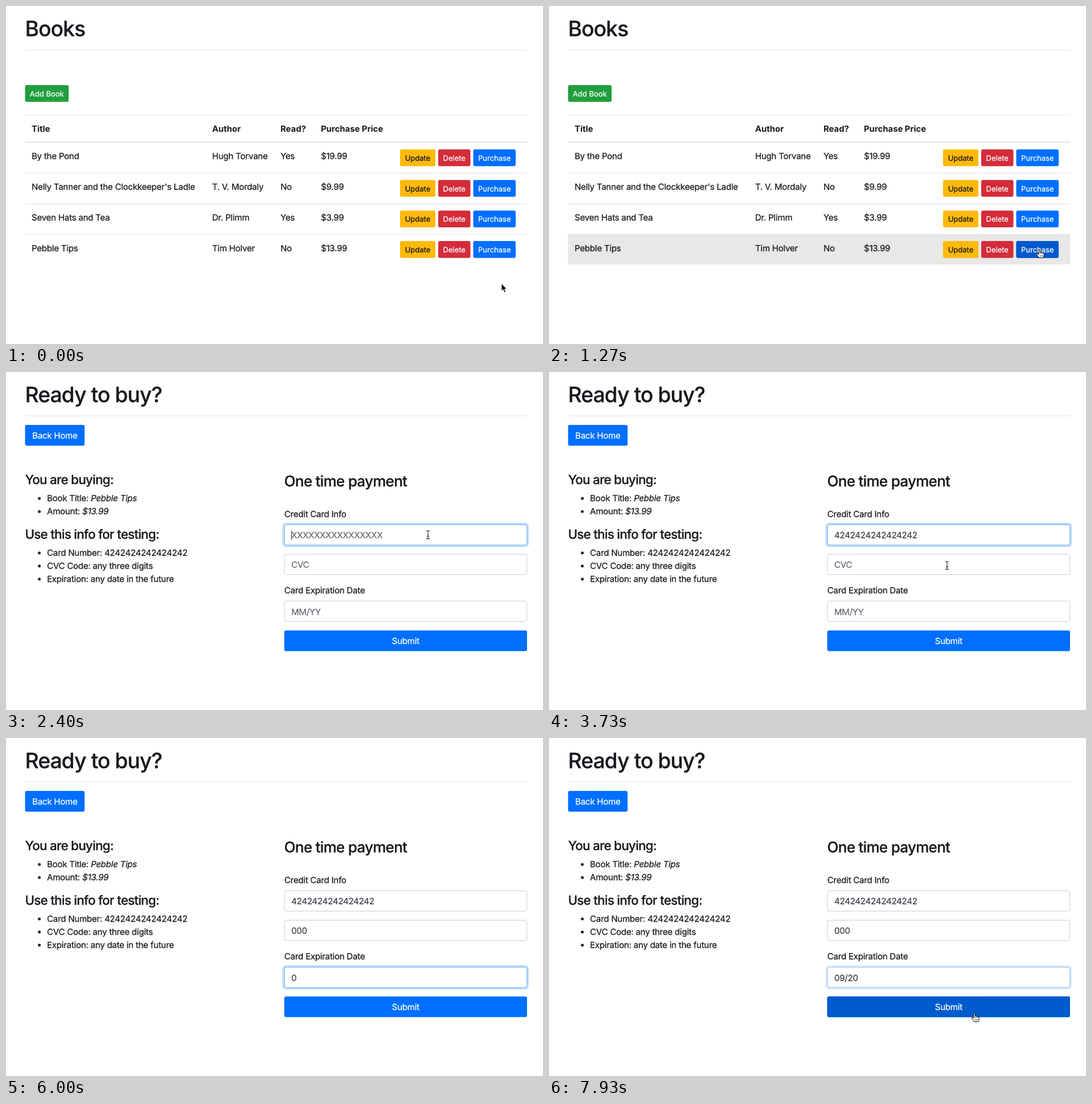
An HTML page that plays this animation: 943x594 px, repeating every 8 s.

```html
<!DOCTYPE html>
<html lang="en">
<head>
<meta charset="utf-8">
<title>Books</title>
<style>
html, body { margin: 0; width: 100%; height: 100%; overflow: hidden; background: #fff; }
svg { display: block; }
text {
  font: 400 15px Inter, "Open Sans", sans-serif;
  font-optical-sizing: none;
  letter-spacing: -.014em;
  text-rendering: geometricPrecision;
  color: #16191d;
  fill: currentColor;
  stroke: currentColor;
  stroke-width: .25px;
}
text.h1, text.h3, text.h4 { font-weight: 500; letter-spacing: -.025em; }
text.h1 { font-size: 37.2px; }
text.h3 { font-size: 26px; letter-spacing: -.027em; }
text.h4 { font-size: 22.3px; letter-spacing: -.032em; }
text.th { font-size: 14.85px; font-weight: 700; letter-spacing: 0; stroke: none; }
text.small { font-size: 13px; letter-spacing: 0; }
text.mid { text-anchor: middle; }
text.white { color: #fff; }
text.value { color: #3a4148; }
text.hint { color: #60686f; }
.italic { font-style: italic; }
.hover { fill: #005fd8; opacity: 0; }
.line { fill: #dcdfe3; }
.box { fill: #fff; stroke: #c5ccd6; }
.ring rect { fill: none; }
.glow { stroke: #007bff; stroke-opacity: .26; stroke-width: 3; }
.edge { stroke: #70b2fb; }
.hand, .arrow { stroke-linejoin: round; }
.hand { fill: #fff; stroke: #000; stroke-width: 1; }
.arrow { fill: #000; stroke: #fff; stroke-width: 1; }
.beam { fill: none; stroke: #222; stroke-width: 1.1; }
</style>
</head>
<body>
<svg id="stage" width="943" height="594" viewBox="0 0 943 594"></svg>
<script>
const LOOP = 8000, FRAME = 1000 / 15;
const BLUE = '#006fff', GREEN = '#229e3e', YELLOW = '#ffb908', RED = '#d42c3a';
const PAGE_TURN = 1270, BLUR = 7860, BLINK = 530;

const text = (x, y, str, cls = '') => `<text x="${x}" y="${y}" class="${cls}">${str}</text>`;
const line = (y, h = 1) => `<rect x="33.5" y="${y}" width="881.5" height="${h}" class="line"/>`;
const rect = (x, y, w, h, attrs) => `<rect x="${x}" y="${y}" width="${w}" height="${h}" ${attrs}/>`;
const button = (x, y, w, h, fill, label, cls = 'small white', id = '') =>
  rect(x, y, w, h, `rx="3" fill="${fill}"`) +
  (id && rect(x, y, w, h, `rx="3" class="hover" id="${id}"`)) +
  text(x + w / 2, y + h / 2 + (cls.includes('small') ? 5 : 5.6), label, 'mid ' + cls);
const bullet = (y, str) => `<circle cx="58.5" cy="${y - 5}" r="2.5" fill="#1b1f23"/>` + text(72, y, str);

const books = [
  ['By the Pond', 'Hugh Torvane', 'Yes', '$19.99'],
  ["Nelly Tanner and the Clockkeeper's Ladle", 'T. V. Mordaly', 'No', '$9.99'],
  ['Seven Hats and Tea', 'Dr. Plimm', 'Yes', '$3.99'],
  ['Pebble Tips', 'Tim Holver', 'No', '$13.99'],
];
const columns = [45, 362, 482, 553];
const heads = ['Title', 'Author', 'Read?', 'Purchase Price'];

const bookRow = (book, i) => {
  const y = 239.8 + i * 53.7, top = y + 12.2, last = i === books.length - 1;
  return (last ? rect(33.5, 401, 881.5, 53, 'id="rowHover" fill="#e8e8e8"') : '') +
    (i ? line(y) : '') +
    book.map((cell, c) => text(columns[c], y + 29.6, cell)).join('') +
    button(692, top, 62, 29.6, YELLOW, 'Update', 'small') +
    button(759, top, 56.5, 29.6, RED, 'Delete') +
    button(820.5, top, 74.5, 29.6, BLUE, 'Purchase', 'small white', last ? 'buyHover' : '');
};

const listPage = text(33.5, 53, 'Books', 'h1') + line(76.5) +
  button(33.5, 139, 76.5, 29.6, GREEN, 'Add Book') +
  line(191.5) + line(238.5, 1.9) +
  heads.map((head, c) => text(columns[c], 221.3, head, 'th')).join('') +
  books.map(bookRow).join('');

const fields = [
  { y: 268.4, hint: 'X'.repeat(16), focus: 2270, blur: 3870, typed: [[3130, '42'.repeat(8)]] },
  { y: 320.2, hint: 'CVC', focus: 3870, blur: 5130, typed: [[4400, '0'], [4600, '00'], [4800, '000']] },
  { y: 402.7, hint: 'MM/YY', focus: 5130, blur: BLUR,
    typed: [[5470, '0'], [6470, '09/'], [6670, '09/2'], [6800, '09/20']] },
];
const fieldMarkup = ({ y }) =>
  rect(489, y, 425.7, 35.8, 'rx="3.4" class="box"') +
  `<g class="ring">${rect(487, y - 2, 429.7, 39.8, 'rx="5" class="glow"')}` +
  `${rect(489, y, 425.7, 35.8, 'rx="3.4" class="edge"')}</g>` +
  text(501, y + 24, '', 'value');

const payPage = text(33.5, 53, 'Ready to buy?', 'h1') + line(76.5) +
  button(33.5, 93, 104.5, 36.4, BLUE, 'Back Home', 'white') +
  text(33.5, 197, 'You are buying:', 'h4') +
  bullet(227.3, 'Book Title: <tspan class="italic">Pebble Tips</tspan>') +
  bullet(250.2, 'Amount: <tspan class="italic">$13.99</tspan>') +
  text(33.5, 293, 'Use this info for testing:', 'h4') +
  bullet(323, 'Card Number: 4242424242424242') +
  bullet(346, 'CVC Code: any three digits') +
  bullet(369, 'Expiration: any date in the future') +
  text(488.5, 201, 'One time payment', 'h3') +
  text(488.8, 255, 'Credit Card Info') +
  text(488.8, 389, 'Card Expiration Date') +
  fields.map(f => `<g class="field">${fieldMarkup(f)}</g>`).join('') +
  rect(501, 0, 1, 17, 'id="caret" fill="#333"') +
  button(488.6, 454.3, 426.4, 36.2, BLUE, 'Submit', 'white', 'submitHover');

const pointers = `<g id="pointer">
  <path class="arrow" d="M0 -.5V13L3 10.3L5.2 15.4L7.6 14.4L5.4 9.4H9.4Z"/>
  <g class="hand">
    <path d="M-1.2 1C-1.2 -.6 1.2 -.6 1.2 1V5C1.5 4 3.6 4.2 3.6 5.6C4 4.8 6 5 6 6.3C6.6 5.6 8.2 6 8.2 7.4V10C8.2 12 7 13 7 14.6H-.4C-.8 13 -3 11.5 -4.4 9.2C-5.6 7.4 -3.6 6.4 -2.6 7.6L-1.2 9Z"/>
    <path d="M1.2 5V8M3.6 5.6V8M6 6.3V8M1.5 10V12.5M3.5 10V12.5M5.5 10V12.5" stroke-width=".7"/>
  </g>
  <path class="beam" d="M-3.3 -7.3Q0 -7.3 0 -5.5Q0 -7.3 3.3 -7.3M0 -6V6M-3.3 7.3Q0 7.3 0 5.5Q0 7.3 3.3 7.3M-2 2.5H2"/>
</g>`;

const $ = id => document.getElementById(id);
$('stage').innerHTML = `<g id="listPage">${listPage}</g><g id="payPage">${payPage}</g>${pointers}`;
const [arrow, hand, beam] = $('pointer').children;
document.querySelectorAll('.field').forEach((node, i) => {
  fields[i].ring = node.querySelector('.ring');
  fields[i].value = node.querySelector('text');
});

// Pointer path: time, x, y
const path = [
  [133, 870, 488], [400, 866, 466], [533, 861.5, 441], [660, 861, 431], [800, 861, 428],
  [1600, 861, 428], [1870, 820, 377], [2070, 762, 306], [2270, 741, 286],
  [3400, 741, 286], [3530, 723, 306], [3733, 699, 340],
  [7133, 699, 340], [7333, 760, 371], [7530, 760, 415], [7700, 751, 465], [7867, 747, 484],
];
const hidden = [[3130, 3470], [4400, 7200]];
const caretResets = fields.flatMap(f => [f.focus, ...f.typed.map(([at]) => at)]);

const show = (node, on) => node.setAttribute('visibility', on ? 'inherit' : 'hidden');
const fade = (t, start, length = 150) => {
  const p = Math.min(1, Math.max(0, (t - start) / length));
  return p * p * (3 - 2 * p);
};

function pointerAt(t) {
  const next = path.findIndex(([at]) => at > t);
  if (next < 0) return path[path.length - 1].slice(1);
  if (next === 0) return path[0].slice(1);
  const [t0, x0, y0] = path[next - 1], [t1, x1, y1] = path[next];
  const p = (t - t0) / (t1 - t0);
  return [x0 + (x1 - x0) * p, y0 + (y1 - y0) * p];
}

function drawPointer(t) {
  const [x, y] = pointerAt(t);
  const paying = t >= 1330;
  const overField = paying && fields.some(f => y > f.y && y < f.y + 36);
  const overButton = paying ? y > 454 && y < 490 : y > 413 && y < 442.5;
  $('pointer').setAttribute('transform', `translate(${x} ${y})`);
  show($('pointer'), !hidden.some(([from, to]) => t >= from && t < to));
  show(beam, overField);
  show(hand, overButton);
  show(arrow, !overField && !overButton);
  show($('rowHover'), t < PAGE_TURN && y > 401 && y < 454);
}

function drawFields(t) {
  for (const f of fields) {
    const typed = f.typed.filter(([at]) => t >= at).pop();
    f.value.textContent = typed ? typed[1] : f.hint;
    f.value.setAttribute('class', typed ? 'value' : 'hint');
    f.ring.style.opacity = fade(t, f.focus) - fade(t, f.blur);
    if (t >= f.focus && t < f.blur) {
      $('caret').setAttribute('x', 501 + (typed ? f.value.getComputedTextLength() : 0));
      $('caret').setAttribute('y', f.y + 10);
    }
  }
  const reset = Math.max(...caretResets.filter(at => at <= t));
  show($('caret'), t >= fields[0].focus && t < BLUR && (t - reset) % (2 * BLINK) < BLINK);
}

function draw(now) {
  const t = Math.floor((now % LOOP + 5) / FRAME) * FRAME;
  show($('listPage'), t < PAGE_TURN);
  show($('payPage'), t >= PAGE_TURN);
  drawPointer(t);
  drawFields(t);
  $('buyHover').style.opacity = fade(t, 533);
  $('buyHover').style.fill = t >= 1200 ? '#0059cc' : '';
  $('submitHover').style.opacity = fade(t, 7680);
  $('submitHover').style.fill = t >= BLUR ? '#005bcf' : '';
}

const start = performance.now();
(function tick() {
  draw(performance.now() - start);
  requestAnimationFrame(tick);
})();
</script>
</body>
</html>
```
